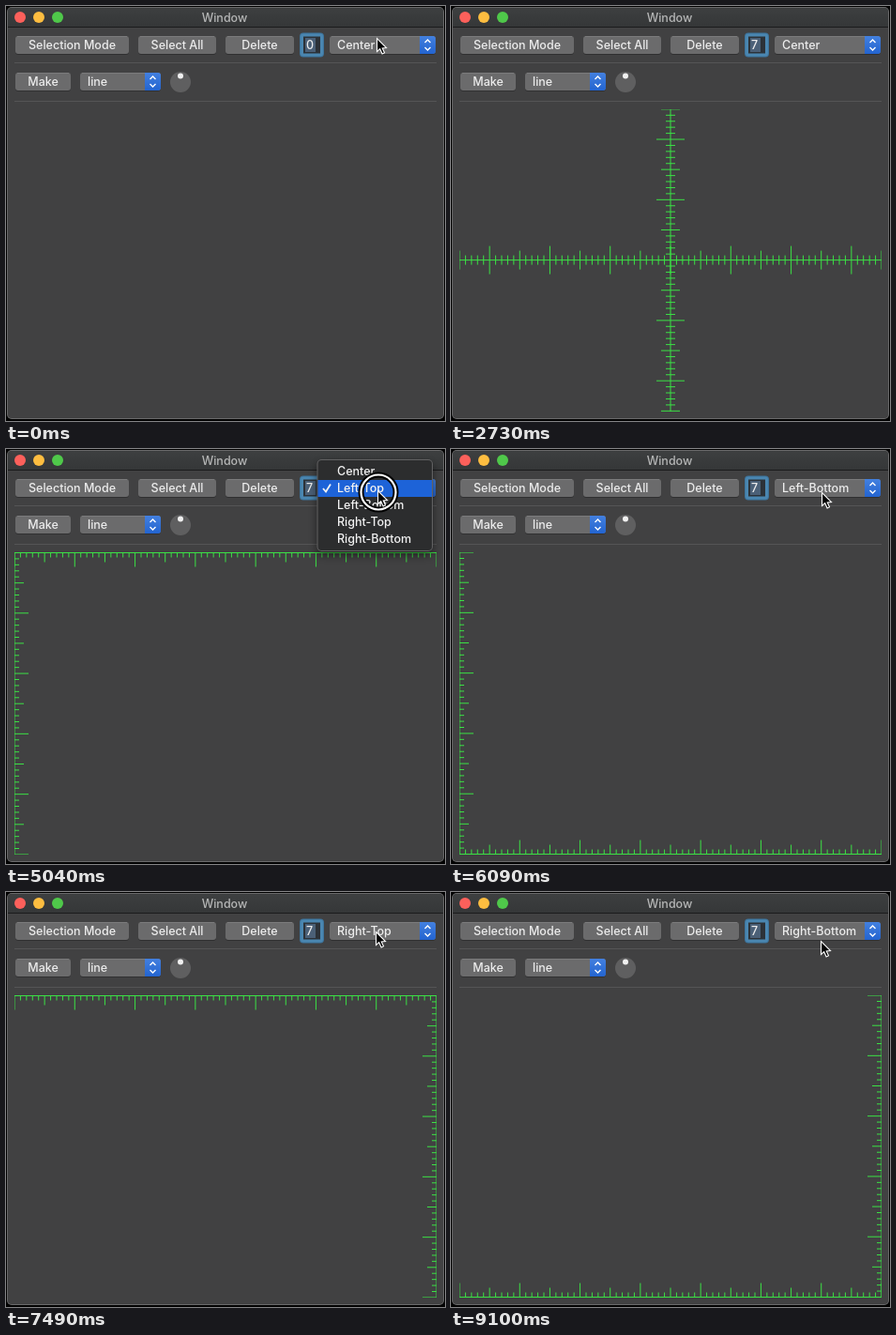
An HTML page with a canvas that plays this animation: 468 px wide and 442 px high, repeating every 9240 ms.

```html
<!DOCTYPE html>
<html lang="en">
<head>
<meta charset="utf-8">
<title>Ruler window</title>
<style>
  html, body { margin: 0; width: 100%; height: 100%; overflow: hidden; background: #000; }
  canvas { display: block; }
</style>
</head>
<body>
<canvas id="stage" width="468" height="442"></canvas>
<script>
const ctx = document.getElementById('stage').getContext('2d');
const LOOP = 9240, STEP = 70;
const TYPE_AT = 1400, COMMIT_AT = 1750, POINTER_BACK = 3080;
const FONT = '500 12.5px Inter, "Open Sans", sans-serif';
const OPTIONS = ['Center', 'Left-Top', 'Left-Bottom', 'Right-Top', 'Right-Bottom'];
const ROW = 18;

// Each menu visit moves the choice one row down.
const VISITS = [
  { open: 3710, pick: 4480 },
  { open: 4970, pick: 5670 },
  { open: 6300, pick: 6930 },
  { open: 7700, pick: 8330 }
];

// Pointer path: time, x, y
const PATH = [
  [0, 395, 34], [3300, 395, 34], [3640, 395, 41], [3850, 395, 41], [4200, 395, 54],
  [4620, 395, 54], [4900, 396, 44], [5110, 396, 44], [5460, 395, 60], [5670, 395, 60],
  [6020, 395, 46], [6440, 395, 46], [6720, 395, 59], [6930, 395, 59], [7350, 394, 42],
  [7840, 394, 42], [8120, 394, 58], [8400, 394, 58], [8820, 394, 52], [LOOP, 394, 52]
];

function pointerAt(t) {
  const i = PATH.findIndex(p => p[0] > t);
  const [t0, x0, y0] = PATH[i - 1], [t1, x1, y1] = PATH[i];
  const u = (t - t0) / (t1 - t0), e = u * u * (3 - 2 * u);
  return { x: x0 + (x1 - x0) * e, y: y0 + (y1 - y0) * e };
}

function box(x, y, w, h, r, fill) {
  ctx.beginPath();
  ctx.roundRect(x, y, w, h, r);
  ctx.fillStyle = fill;
  ctx.fill();
}

function disc(x, y, r, fill) {
  ctx.beginPath();
  ctx.arc(x, y, r, 0, 7);
  ctx.fillStyle = fill;
  ctx.fill();
}

function polyline(points, color, width) {
  ctx.beginPath();
  points.forEach(([x, y]) => ctx.lineTo(x, y));
  ctx.strokeStyle = color;
  ctx.lineWidth = width;
  ctx.stroke();
}

function label(text, x, y, color = '#ececec', align = 'left') {
  ctx.font = FONT;
  ctx.textAlign = align;
  ctx.fillStyle = color;
  ctx.fillText(text, x, y);
}

function control(x, y, w) {
  box(x, y + 0.5, w, 19.5, 3, '#303031');
  box(x, y, w, 19, 3, '#6b6b6c');
  ctx.fillStyle = '#7b7b7c';
  ctx.fillRect(x + 2, y, w - 4, 1);
}

function button(text, x, y, w) {
  control(x, y, w);
  label(text, x + w / 2, y + 14, undefined, 'center');
}

function dropdown(text, x, y, w) {
  control(x, y, w);
  label(text, x + 8, y + 14);
  const blue = ctx.createLinearGradient(0, y, 0, y + 19);
  blue.addColorStop(0, '#4380df');
  blue.addColorStop(1, '#2364d0');
  box(x + w - 17, y, 17, 19, [0, 3, 3, 0], blue);
  const cx = x + w - 8.5, cy = y + 9.5;
  for (const s of [-1, 1])
    polyline([[cx - 3, cy + s * 2.5], [cx, cy + s * 5.5], [cx + 3, cy + s * 2.5]], '#fff', 1.4);
}

function drawWindow() {
  ctx.fillStyle = '#000';
  ctx.fillRect(0, 0, 468, 442);
  box(1, 1, 466, 439, 5, '#69696a');
  box(2, 2, 464, 437, 4, '#414142');
  const bar = ctx.createLinearGradient(0, 2, 0, 22);
  bar.addColorStop(0, '#3d3f40');
  bar.addColorStop(1, '#353738');
  box(2, 2, 464, 20, [4, 4, 0, 0], bar);
  ctx.fillStyle = '#1b1b1c';
  ctx.fillRect(2, 22, 464, 1);
  ['#fc605b', '#fdbd40', '#4fc84a'].forEach((color, i) => disc(15 + 20 * i, 12, 6, color));
  label('Window', 233, 17, '#b5b6b6', 'center');
  ctx.fillStyle = '#555556';
  ctx.fillRect(9, 60, 450, 1);
  ctx.fillRect(9, 101, 450, 1);
}

function drawField(t) {
  box(313, 28.5, 26, 26, 4, '#3d749c');
  box(314, 29.5, 24, 24, 3, '#4a86b0');
  box(317, 32.5, 18, 18, 0, '#2c3238');
  const typing = t >= TYPE_AT && t < COMMIT_AT;
  if (!typing) box(319, 34, 11, 15, 0, '#4b6077');
  label(t < TYPE_AT ? '0' : '7', 320, 46);
  if (typing) box(329, 34, 1, 15, 0, '#ddd');
}

function drawRuler(choice) {
  const left = 9, top = 110, width = 450, height = 322;
  const unit = width / 70;
  const name = OPTIONS[choice], centered = choice === 0;
  const right = name.startsWith('Right'), bottom = name.endsWith('Bottom');
  const ox = centered ? left + width / 2 : left + (right ? width : 0);
  const oy = centered ? 270.6 : bottom ? 431.5 : 110.5;
  const size = n => n % 10 === 0 ? 15 : n % 5 === 0 ? 10 : 5;

  ctx.save();
  ctx.beginPath();
  ctx.rect(left, top, width, height);
  ctx.clip();
  ctx.beginPath();
  ctx.moveTo(left, oy);
  ctx.lineTo(left + width, oy);
  ctx.moveTo(ox, top);
  ctx.lineTo(ox, top + height);
  for (let n = -70; n <= 70; n++) {
    const s = size(n), x = ox + n * unit, y = oy + n * unit;
    ctx.moveTo(x, oy - s);
    ctx.lineTo(x, oy + s);
    ctx.moveTo(ox - s, y);
    ctx.lineTo(ox + s, y);
  }
  ctx.strokeStyle = '#3be145';
  ctx.lineWidth = 1;
  ctx.stroke();
  ctx.restore();
}

function drawMenu(choice, pointer, blink) {
  const x = 331.5, w = 123.5, top = 29 - ROW * choice, h = 98;
  ctx.save();
  ctx.shadowColor = 'rgba(0,0,0,.5)';
  ctx.shadowBlur = 10;
  ctx.shadowOffsetY = 4;
  box(x, top, w, h, 5, '#626263');
  ctx.restore();
  box(x + 1, top + 1, w - 2, h - 2, 4, '#2c2d2e');
  const hover = Math.floor((pointer.y - top - 4) / ROW);
  if (!blink) box(x + 1, top + 4 + hover * ROW, w - 2, ROW, 0, '#1d63d8');
  OPTIONS.forEach((text, i) => label(text, 353, top + 17 + i * ROW, '#f2f2f2'));
  polyline([[338, 42], [341, 45.5], [346, 37.5]], '#f2f2f2', 1.8);
}

function drawPointer({ x, y }, pressed) {
  if (pressed) {
    ctx.beginPath();
    ctx.arc(x + 1, y + 2, 18.5, 0, 7);
    ctx.strokeStyle = '#000';
    ctx.lineWidth = 6;
    ctx.stroke();
    ctx.strokeStyle = '#fff';
    ctx.lineWidth = 2.2;
    ctx.stroke();
  }
  ctx.save();
  ctx.translate(x + 0.5, y + 0.5);
  ctx.beginPath();
  [[0, 0], [0, 14], [3.2, 11.2], [5.6, 16.4], [8, 15.3], [5.7, 10.4], [10, 10]]
    .forEach(([px, py]) => ctx.lineTo(px, py));
  ctx.closePath();
  ctx.fillStyle = '#000';
  ctx.fill();
  ctx.strokeStyle = '#fff';
  ctx.lineWidth = 1.1;
  ctx.stroke();
  ctx.restore();
}

function draw(t) {
  const choice = VISITS.filter(v => t >= v.pick + STEP).length;
  const visit = VISITS.find(v => t >= v.open && t < v.pick + STEP);
  const pointer = pointerAt(t);

  drawWindow();
  button('Selection Mode', 10, 32, 121);
  button('Select All', 141, 32, 83);
  button('Delete', 234, 32, 73);
  drawField(t);
  dropdown(OPTIONS[choice], 345, 32, 113);
  button('Make', 10, 71, 59);
  dropdown('line', 79, 71, 86);
  disc(186, 81, 11, '#5f5f60');
  disc(186, 74.5, 3, '#f0f0f0');

  if (t >= COMMIT_AT) drawRuler(choice);
  if (visit) drawMenu(choice, pointer, t >= visit.pick);
  if (t < TYPE_AT || t >= POINTER_BACK) {
    const pressed = visit && (t < visit.open + 140 || (t >= visit.pick - 210 && t < visit.pick - 70));
    drawPointer(pointer, pressed);
  }
}

function frame() {
  draw(Math.floor(performance.now() % LOOP / STEP) * STEP);
  requestAnimationFrame(frame);
}
frame();
</script>
</body>
</html>
```
